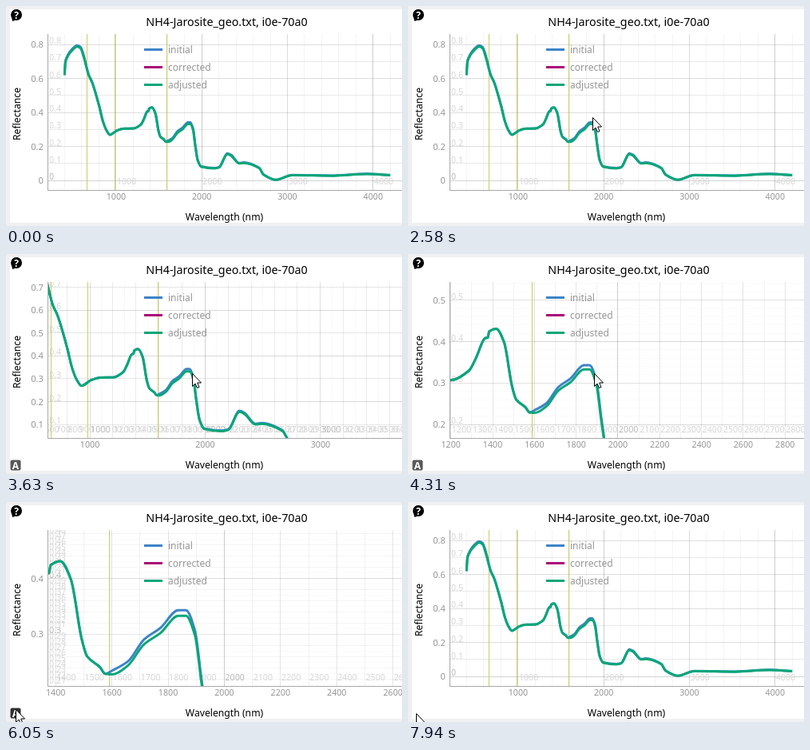
Write an HTML page with a canvas that moves like this. It is 496x275 px and loops after 8000 ms.

```html
<!DOCTYPE html>
<html lang="en">
<head>
<meta charset="utf-8">
<title>Reflectance plot</title>
<style>
html, body { margin: 0; width: 100%; height: 100%; overflow: hidden; background: #f0f0f0; }
canvas { display: block; }
</style>
</head>
<body>
<canvas id="stage" width="496" height="275"></canvas>
<script>
const ctx = document.getElementById('stage').getContext('2d');
const LOOP = 8000, LEFT = 52, TOP = 35, RIGHT = 496, BOTTOM = 230;
const FONT = '"Noto Sans", "Open Sans", sans-serif';
const BLUE = '#3c84c8', PURPLE = '#aa0a78', GREEN = '#0aa678', GREY = '#969696';

// key points: wavelength (nm), reflectance (thousandths)
const KEYS = [
  [394, 621], [405, 700], [469, 760], [543, 789], [581, 779], [618, 728], [675, 624],
  [716, 579], [799, 438], [841, 351], [882, 298], [924, 271], [1007, 296], [1090, 307],
  [1200, 308], [1285, 331], [1319, 362], [1361, 409], [1375, 411], [1381, 425], [1415, 432],
  [1453, 399], [1491, 293], [1511, 261], [1556, 242], [1575, 230], [1600, 229], [1656, 245],
  [1713, 283], [1771, 303], [1835, 334], [1862, 334], [1894, 299], [1919, 208], [1948, 120],
  [1990, 82], [2142, 73], [2197, 78], [2294, 157], [2335, 149], [2432, 102], [2487, 105],
  [2667, 74], [2715, 37], [2864, 6], [3050, 33], [3535, 30], [3925, 40], [4195, 33]
];
const SPLITS = [661, 985, 1591];
const spectrum = gain => KEYS.map(([x, y]) => [x, y / 1000 * gain(x)]);
const ADJUSTED = spectrum(() => 1);
const INITIAL = spectrum(x => x < SPLITS[0] ? 1.01 : x < SPLITS[2] ? 1 : 1.03);

// wheel zoom about one fixed point: [time, wheel steps]
const ZOOMS = [[0, 0], [3630, 1], [4060, 2], [4310, 3], [4430, 4], [7940, 0]];
const WHEEL = 1.02 ** 15;
const PIVOT = [{ px: 232.8, value: 1884.6, scale: 0.1073 }, { px: 149.35, value: 0.3231, scale: -212.5 }];

// glides of the pointer: [time, steps, x, y]
const STEP = 120, ENTRY = [392, 278];
const GLIDES = [
  [790, 3, 291, 217], [1180, 2, 230, 166], [1420, 2, 228, 151], [1680, 1, 228, 147],
  [2070, 2, 214, 132], [2310, 2, 224, 136], [2580, 1, 231, 139], [2700, 2, 229, 154],
  [2970, 1, 239, 149], [3110, 3, 233, 149], [4850, 7, 26, 258], [5690, 4, 12, 259],
  [6470, 3, 8, 249], [6830, 3, 17, 253], [7220, 1, 10, 264]
];

const ease = p => p * p * (3 - 2 * p);
const crisp = n => Math.floor(n) + 0.5;
const tidy = n => String(+n.toFixed(2));

function pointerAt(t) {
  let pos = null, from = ENTRY;
  for (const [start, steps, x, y] of GLIDES) {
    if (t < start) break;
    const p = ease(Math.min(1, (Math.floor((t - start) / STEP) + 1) / steps));
    pos = [from[0] + (x - from[0]) * p, from[1] + (y - from[1]) * p].map(Math.round);
    from = [x, y];
  }
  return pos;
}

// Tick spacing of one axis: three nested levels, the label step and the overlay step
function makeAxis(i, zoom) {
  const { px, value, scale } = PIVOT[i];
  const k = scale * WHEEL ** zoom;
  const [start, end, labelGap, overlayGap] = i ? [BOTTOM, TOP, 25, 6] : [LEFT, RIGHT, 45, 12];
  const at = v => px + (v - value) * k;
  const valueAt = p => value + (p - px) / k;
  const size = Math.abs(end - start), density = Math.abs(k);
  const ideal = size / density / Math.log(size);
  const p = 10 ** Math.floor(Math.log10(ideal));
  const levels = 2 * p <= ideal ? [20 * p, 10 * p, 2 * p] : [10 * p, 2 * p, p];
  return {
    at, density, levels,
    label: levels.filter(s => s * density >= labelGap).pop(),
    overlay: 10 ** Math.ceil(Math.log10(overlayGap / density)),
    each(step, draw, margin = 0) {
      const last = valueAt(end + (i ? -margin : 0));
      const first = valueAt(start - (i ? 0 : margin));
      for (let n = Math.ceil(first / step); n * step <= last; n++) draw(n * step, at(n * step), n);
    }
  };
}

function text(str, x, y, size, color, align = 'left') {
  ctx.font = `${size}px ${FONT}`;
  ctx.fillStyle = color;
  ctx.textAlign = align;
  ctx.fillText(str, x, y);
}

function line(x1, y1, x2, y2, color, width = 1) {
  ctx.strokeStyle = color;
  ctx.lineWidth = width;
  ctx.beginPath();
  ctx.moveTo(x1, y1);
  ctx.lineTo(x2, y2);
  ctx.stroke();
}

const vertical = (x, color) => line(crisp(x), TOP, crisp(x), BOTTOM, color);
const horizontal = (y, color) => line(LEFT, crisp(y), RIGHT, crisp(y), color);

function disc(x, y, r, color) {
  ctx.fillStyle = color;
  ctx.beginPath();
  ctx.arc(x, y, r, 0, 7);
  ctx.fill();
}

function polygon(points, fill, stroke) {
  ctx.beginPath();
  points.forEach(([x, y]) => ctx.lineTo(x, y));
  ctx.closePath();
  ctx.fillStyle = fill;
  ctx.fill();
  if (stroke) {
    ctx.strokeStyle = stroke;
    ctx.lineWidth = 1;
    ctx.stroke();
  }
}

function gridLines(axis, rule) {
  for (const step of [...axis.levels, axis.overlay]) {
    const alpha = 0.05 * Math.min(1, step * axis.density / 25);
    axis.each(step, (v, p) => rule(p, `rgba(0,0,0,${alpha})`));
  }
}

function overlayLabels(ax, ay) {
  const shade = n => n % 10 ? '#d6d6d6' : '#b8b8b8';
  ax.each(ax.overlay, (v, p, n) => text(tidy(v), p + 1, 223, 10.7, shade(n)), 30);
  ay.each(ay.overlay, (v, p, n) => text(tidy(v), 54, p - 1, 10.7, shade(n)), 12);
}

// monotone cubic through the key points, so that peaks do not overshoot
function curve(ax, ay, data, color) {
  const pts = data.map(([x, y]) => [ax.at(x) + 0.5, ay.at(y) + 0.5]);
  const chord = i => (pts[i + 1][1] - pts[i][1]) / (pts[i + 1][0] - pts[i][0]);
  const slope = i => {
    if (i === 0) return chord(0);
    if (i === pts.length - 1) return chord(i - 1);
    const a = chord(i - 1), b = chord(i);
    return a * b > 0 ? 2 * a * b / (a + b) : 0;
  };
  ctx.strokeStyle = color;
  ctx.lineWidth = 3;
  ctx.lineJoin = 'round';
  ctx.beginPath();
  ctx.moveTo(...pts[0]);
  for (let i = 1; i < pts.length; i++) {
    const [x1, y1] = pts[i - 1], [x2, y2] = pts[i], h = (x2 - x1) / 3;
    ctx.bezierCurveTo(x1 + h, y1 + h * slope(i - 1), x2 - h, y2 - h * slope(i), x2, y2);
  }
  ctx.stroke();
}

function plot(ax, ay) {
  ctx.save();
  ctx.beginPath();
  ctx.rect(LEFT, TOP, RIGHT - LEFT, BOTTOM - TOP);
  ctx.clip();
  gridLines(ax, vertical);
  gridLines(ay, horizontal);
  overlayLabels(ax, ay);
  SPLITS.forEach(x => vertical(ax.at(x), '#cbca6a'));
  curve(ax, ay, INITIAL, BLUE);
  curve(ax, ay, ADJUSTED, GREEN);
  ctx.restore();
}

function legend() {
  [['initial', BLUE], ['corrected', PURPLE], ['adjusted', GREEN]].forEach(([name, color], i) => {
    const y = 54.5 + i * 22;
    line(173, y, 196, y, color, 3);
    text(name, 203, y + 4.5, 12, GREY);
  });
}

function axes(ax, ay) {
  vertical(LEFT, '#a8a8a8');
  horizontal(BOTTOM, '#a8a8a8');
  ax.each(ax.label, (v, p) => text(tidy(v), p, 242, 10.7, GREY, 'center'));
  ay.each(ay.label, (v, p) => text(tidy(v), 47, p + 4, 11.2, GREY, 'right'));
  text('NH4-Jarosite_geo.txt, i0e-70a0', 276.5, 25, 14.3, '#000', 'center');
  text('Wavelength (nm)', 273.5, 268, 12.2, '#000', 'center');
  ctx.save();
  ctx.translate(18, 135);
  ctx.rotate(-Math.PI / 2);
  text('Reflectance', 0, 0, 12.2, '#000', 'center');
  ctx.restore();
}

function helpIcon() {
  disc(13, 11, 7, '#000');
  polygon([[7, 13], [8, 19], [14, 17]], '#000');
  text('?', 13, 15.5, 'bold 12', '#fff', 'center');
}

function autoIcon(hover) {
  ctx.fillStyle = hover ? '#303030' : '#585858';
  ctx.beginPath();
  ctx.roundRect(5.5, 257.5, 13, 13, 2);
  ctx.fill();
  text('A', 12, 268.5, 'bold 12', '#fff', 'center');
}

function clickRing([x, y]) {
  disc(x + 1.5, y + 1.5, 10.5, '#000');
  disc(x + 1.5, y + 1.5, 9.5, '#fff');
}

function pointer([x, y]) {
  ctx.save();
  ctx.translate(x + 0.5, y + 0.5);
  polygon([[0, 0], [0, 16], [3.5, 12.5], [6, 18], [8.5, 17], [6.2, 11.5], [11, 11.5]], '#fff', '#000');
  ctx.restore();
}

function draw(now) {
  const t = now % LOOP;
  const zoom = ZOOMS.filter(([start]) => start <= t).pop()[1];
  const ax = makeAxis(0, zoom), ay = makeAxis(1, zoom);
  const pos = pointerAt(t);
  ctx.fillStyle = '#f0f0f0';
  ctx.fillRect(0, 0, 496, 275);
  ctx.fillStyle = '#fff';
  ctx.fillRect(5, 4, 491, 267);
  plot(ax, ay);
  legend();
  axes(ax, ay);
  helpIcon();
  if (zoom) autoIcon(pos[0] < 19 && pos[1] > 256);
  if (t >= 7770 && t < 7940) clickRing(pos);
  if (pos) pointer(pos);
  requestAnimationFrame(draw);
}
requestAnimationFrame(draw);
</script>
</body>
</html>
```
